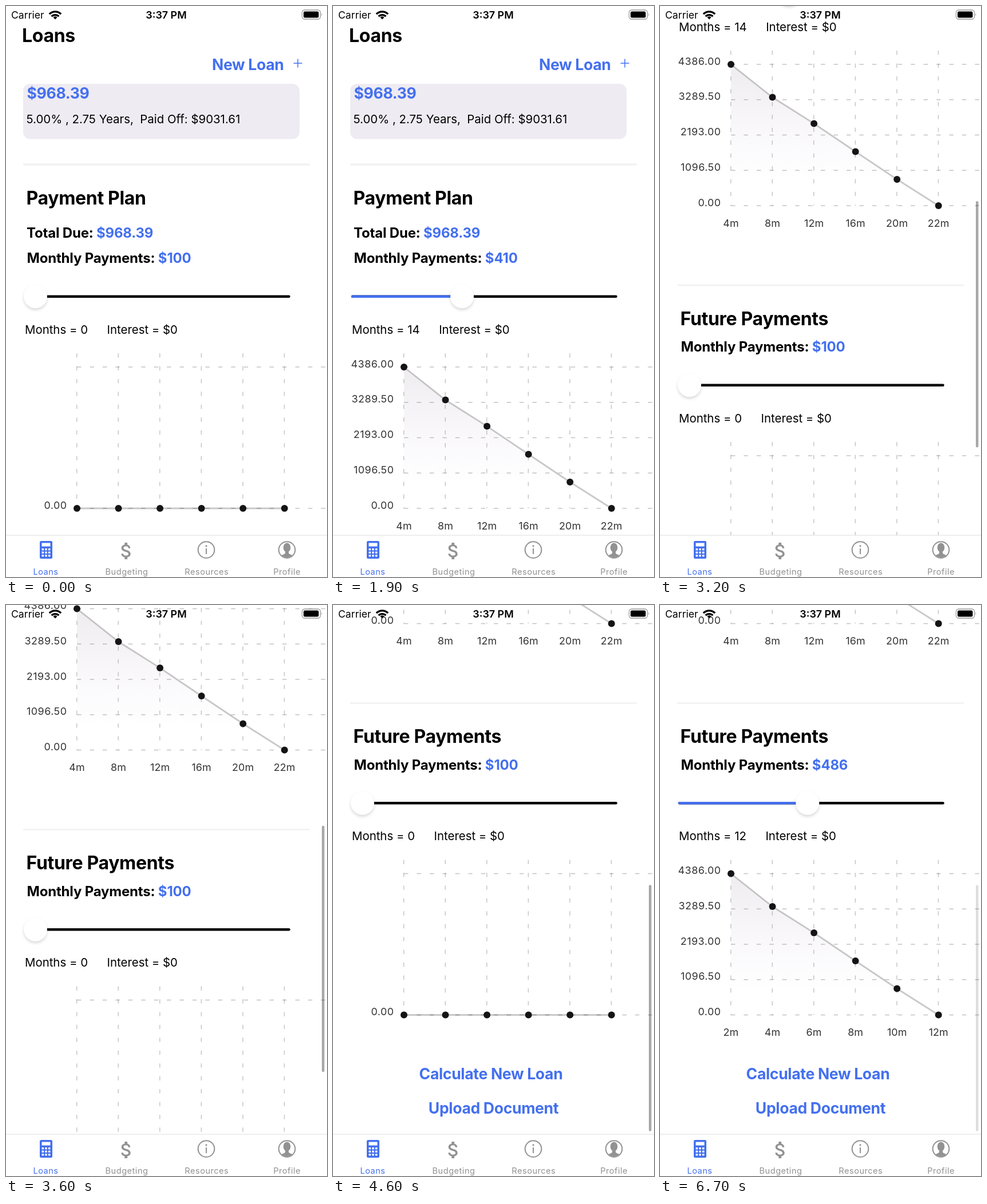
An HTML page for the animation above (6800 ms loop, 561 px wide and 998 px high).

```html
<!DOCTYPE html>
<html lang="en">
<head>
<meta charset="utf-8">
<title>Loans</title>
<style>
  html, body { margin: 0; width: 100%; height: 100%; overflow: hidden; background: #fff; }
  svg { display: block; width: 100vw; height: 100vh; }
  text { font-family: Inter, Roboto, sans-serif; white-space: pre; }
  .title { font-size: 32px; font-weight: 700; letter-spacing: -.01em; }
  .link { font-size: 26.6px; font-weight: 700; letter-spacing: -.013em; }
  .label { font-size: 24px; font-weight: 700; letter-spacing: -.008em; }
  .body { font-size: 20.4px; }
  .tick { font-size: 17.9px; letter-spacing: .5px; fill: #333; }
  .tick.mid { letter-spacing: .1px; }
  .tab { font-size: 14.6px; letter-spacing: .5px; text-anchor: middle; fill: #929292; }
  .blue { fill: #4470ef; }
  .mid { text-anchor: middle; }
  .end { text-anchor: end; }
  .grid { stroke: #000; stroke-opacity: .24; stroke-width: 1.4; stroke-dasharray: 7.48 14.96; fill: none; }
  .curve { stroke: #000; stroke-opacity: .21; stroke-width: 2.8; fill: none; }
  .track { stroke-width: 4.5; stroke-linecap: round; }
  .knob { fill: #fff; filter: drop-shadow(0 3.5px 2.5px rgba(0, 0, 0, .15)); }
  .icon { fill: none; stroke: #929292; stroke-width: 2; }
  .gray { fill: #929292; }
</style>
</head>
<body>
<svg viewBox="0 0 561 998" preserveAspectRatio="none">
  <defs>
    <linearGradient id="shade" gradientUnits="userSpaceOnUse" x1="0" y1="631" x2="0" y2="835">
      <stop offset="0" stop-color="#40204c" stop-opacity=".085"/>
      <stop offset="1" stop-color="#70409c" stop-opacity="0"/>
    </linearGradient>
    <clipPath id="face"><circle cx="491" cy="950.5" r="13.5"/></clipPath>
  </defs>

  <g id="page">
    <text class="title" x="28" y="62.5">Loans</text>
    <text class="link blue" x="360" y="111.5">New Loan</text>
    <path d="M502.5 100h15M510 92.5v15" stroke="#4470ef" stroke-width="1.5"/>
    <rect x="30" y="136" width="483" height="96.5" rx="12" fill="#eeebf2"/>
    <text class="link blue" x="36.5" y="162">$968.39</text>
    <text class="body" x="35.5" y="204.5">5.00% , 2.75 Years,  Paid Off: $9031.61</text>
    <rect x="30" y="275" width="501" height="4" fill="#f3f3f4"/>
    <text class="title" x="35.5" y="346.5">Payment Plan</text>
    <text class="label" x="36" y="405">Total Due: <tspan class="blue">$968.39</tspan></text>
    <g id="plan"></g>
    <rect x="30" y="1015.5" width="501" height="3" fill="#f3f3f4"/>
    <text class="title" x="35.5" y="1086.5">Future Payments</text>
    <g id="future" transform="translate(0 684)"></g>
    <text class="link blue mid" x="276" y="1674">Calculate New Loan</text>
    <text class="link blue mid" x="280.5" y="1734.5">Upload Document</text>
  </g>

  <rect id="bar" x="552" width="4.5" rx="2.25"/>

  <rect y="925" width="561" height="73" fill="#fff"/>
  <path d="M0 925h561" stroke="#dedede" stroke-width="1.2"/>
  <rect class="blue" x="59" y="935" width="22" height="31" rx="2.5"/>
  <g id="keys" fill="#fff"><rect x="62.5" y="938.5" width="15" height="6"/></g>
  <path class="gray" transform="translate(191.3 933.3) scale(1.6)" d="M11.8 10.9c-2.27-.59-3-1.2-3-2.15 0-1.09 1.01-1.85 2.7-1.85 1.78 0 2.44.85 2.5 2.1h2.21c-.07-1.72-1.12-3.3-3.21-3.81V3h-3v2.16c-1.94.42-3.5 1.68-3.5 3.61 0 2.31 1.91 3.46 4.7 4.13 2.5.6 3 1.48 3 2.41 0 .69-.49 1.79-2.7 1.79-2.06 0-2.87-.92-2.98-2.1h-2.2c.12 2.19 1.76 3.42 3.68 3.83V21h3v-2.15c1.95-.37 3.5-1.5 3.5-3.55 0-2.84-2.43-3.81-4.7-4.4z"/>
  <circle class="icon" cx="350" cy="950.5" r="14.3"/>
  <circle class="gray" cx="350" cy="943.8" r="1.6"/>
  <path class="icon" d="M350 948v10"/>
  <circle class="icon" cx="491" cy="950.5" r="14.3"/>
  <g class="gray" clip-path="url(#face)">
    <ellipse cx="491" cy="946.5" rx="6.3" ry="8"/>
    <path d="M488 950h6v6q0 2 7 4v8h-20v-8q7-2 7-4z"/>
  </g>
  <text class="tab" x="69.5" y="994.3" style="fill:#4470ef">Loans</text>
  <text class="tab" x="211" y="994.3">Budgeting</text>
  <text class="tab" x="350.8" y="994.3">Resources</text>
  <text class="tab" x="491.2" y="994.3">Profile</text>

  <text x="9" y="22" font-size="17.6">Carrier</text>
  <g fill="none" stroke="#000" stroke-width="3.2">
    <path d="M75.8 14.2a14 14 0 0 1 20.4 0M79.6 18.2a9 9 0 0 1 12.8 0"/>
    <path d="M86 23.5l-3.6-3.7a5 5 0 0 1 7.2 0z" fill="#000" stroke="none"/>
  </g>
  <text class="mid" x="280" y="22" font-size="17.9" font-weight="600">3:37 PM</text>
  <rect x="517.5" y="7" width="32" height="16" rx="4.5" fill="none" stroke="#999" stroke-width="1.3"/>
  <rect x="520" y="9.5" width="26.5" height="11" rx="2.5"/>
  <path d="M551.3 12.5q2 2.5 0 5z" fill="#999"/>
</svg>
<script>
const LOOP = 6800, STEP = 100, MAX_SCROLL = 845.5, LABEL_LAG = 200;
const $ = id => document.getElementById(id);
const xs = [0, 1, 2, 3, 4, 5].map(i => 124 + i * 72.55);
const ys = [631, 688.5, 734.5, 783.5, 832, 878];
const rows = [0, 1, 2, 3, 4].map(i => 631 + i * 61.75);

const each = (list, fn) => list.map(fn).join('');
const points = list => list.map((y, i) => `${xs[i]},${y}`).join(' ');
const rowLine = y => `<path class="grid" d="M124 ${y}H558"/>`;
const rowText = (y, i) => `<text class="tick end" x="106.5" y="${y + .5}">${(4386 - i * 1096.5).toFixed(2)}</text>`;
const dots = list => each(list, (y, i) => `<circle cx="${xs[i]}" cy="${y}" r="6" fill="#141416"/>`);
const curve = list => `<polyline class="curve" points="${points(list)}"/>${dots(list)}`;

function buildSection(root, months) {
  const flat = xs.map(() => 878);
  root.innerHTML = `
    <text class="label" x="36.5" y="449">Monthly Payments: <tspan class="blue amount"></tspan></text>
    <path class="track" d="M34 507.7H494.5" stroke="#000"/>
    <path class="track fill" stroke="#4470ef"/>
    <circle class="knob" cy="507.7" r="20.5"/>
    <text class="body" x="33" y="572.5">Months = <tspan class="months"></tspan><tspan dx="33.5">Interest = $0</tspan></text>
    ${each(xs, x => `<path class="grid" d="M${x - .3} 607V878"/>`)}
    <g class="empty">${rowLine(631)}${rowLine(878)}${rowText(878, 4)}${curve(flat)}</g>
    <g class="full">
      ${each(rows, rowLine)}${each(rows, rowText)}
      <polygon points="${points(ys)} 124,878" fill="url(#shade)"/>${curve(ys)}
      ${each(xs, (x, i) => `<text class="tick mid" x="${x}" y="914.5">${months[i]}m</text>`)}
    </g>`;
}

function drawSection(root, drag, readyAt, months, t) {
  const find = name => root.querySelector('.' + name);
  const x = 51.5 + 424.5 * at(drag, t);
  const ready = t >= readyAt;
  find('amount').textContent = '$' + (Math.round(1000 * at(drag, t - LABEL_LAG)) || 100);
  find('months').textContent = ready ? months : 0;
  find('knob').setAttribute('cx', x);
  find('fill').setAttribute('d', `M34 507.7H${x}`);
  find('full').style.display = ready ? '' : 'none';
  find('empty').style.display = ready ? 'none' : '';
}

// Linear interpolation through [time, value] pairs
function at(keys, t) {
  if (t <= keys[0][0]) return keys[0][1];
  const i = keys.findIndex(k => k[0] >= t);
  if (i < 0) return keys[keys.length - 1][1];
  const [t0, a] = keys[i - 1], [t1, b] = keys[i];
  return a + (b - a) * (t - t0) / (t1 - t0);
}

const planDrag = [[900, 0], [1000, .03], [1300, .25], [1500, .39], [1600, .41]];
const futureDrag = [[4700, 0], [4800, .03], [4900, .1], [5200, .338], [5300, .42], [5400, .483], [5500, .486]];
const scroll = [[2600, 0], [2700, 60], [2800, 200], [2900, 340], [3000, 430], [3100, 487], [3200, 529],
  [3300, 560], [3400, 586], [3500, 607], [3600, 624.5], [3700, 639], [3800, 651], [3900, 690],
  [4000, 760], [4100, 825], [4200, 858], [4300, 856], [4400, 850], [4500, 847], [4600, MAX_SCROLL]];
const barFade = [[6500, .34], [6700, .13]];

function draw(t) {
  const y = at(scroll, t);
  const top = 93.5 + .468 * Math.min(y, MAX_SCROLL) + Math.max(0, y - MAX_SCROLL);
  $('page').setAttribute('transform', `translate(0 ${-y})`);
  $('bar').setAttribute('y', top);
  $('bar').setAttribute('height', Math.min(430.5, 920 - top));
  $('bar').setAttribute('opacity', t < 2700 ? 0 : at(barFade, t));
  drawSection($('plan'), planDrag, 1800, 14, t);
  drawSection($('future'), futureDrag, 5900, 12, t);
}

buildSection($('plan'), [4, 8, 12, 16, 20, 22]);
buildSection($('future'), [2, 4, 6, 8, 10, 12]);
$('keys').innerHTML += each([0, 1, 2, 3, 4, 5, 6, 7, 8], i =>
  `<rect x="${62.5 + i % 3 * 5.7}" y="${948 + Math.floor(i / 3) * 5.5}" width="3.6" height="3.6" rx="1"/>`);

const start = performance.now();
let last = -1;
function tick() {
  const t = Math.floor((performance.now() - start) % LOOP / STEP) * STEP;
  if (t !== last) draw(last = t);
  requestAnimationFrame(tick);
}
tick();
</script>
</body>
</html>
```
